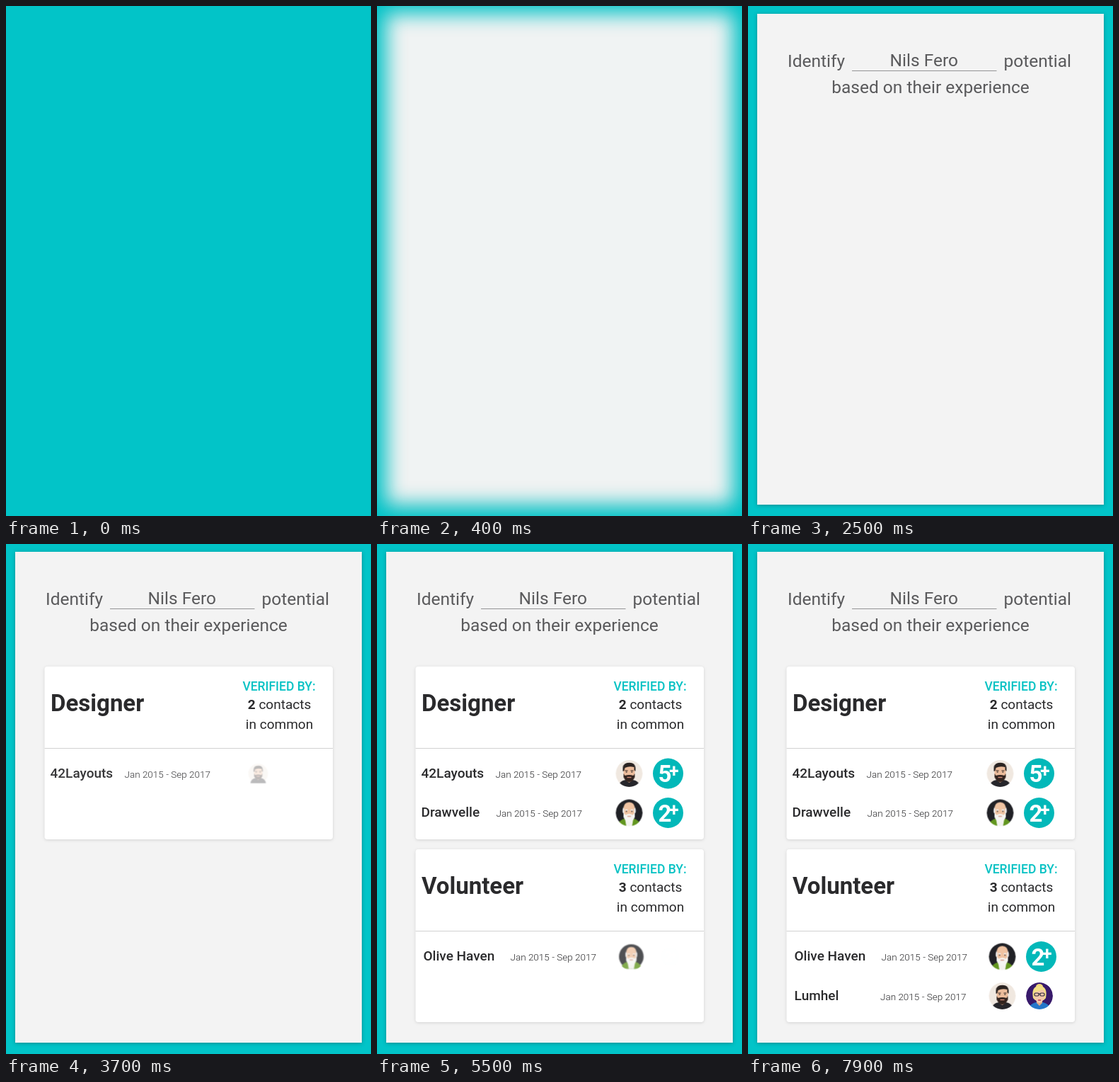
Recreate the animation shown at these times as an HTML page. Size 516 px wide and 720 px high, loop 8 s.

```html
<!DOCTYPE html>
<html lang="en">
<head>
<meta charset="utf-8">
<title>Potential by experience</title>
<style>
  html, body { margin: 0; width: 100%; height: 100%; overflow: hidden; background: #02c4c8; }
  #stage { position: relative; width: 516px; height: 720px; overflow: hidden; background: #02c4c8; }
  #panel { position: absolute; left: 13px; top: 11px; width: 490px; height: 693px;
           background: #f3f3f3; box-shadow: 0 1px 5px rgba(0, 70, 75, .45); }
  svg { position: absolute; left: 0; top: 0; }
  text { font-family: Roboto, sans-serif; fill: #2a2a2c; white-space: pre; }
  .head text { font-size: 24.5px; fill: #5a5a5c; }
  .card, .pop { transform-box: fill-box; transform-origin: center; }
  .sheet { fill: #fff; filter: drop-shadow(0 1px 2px rgba(0, 0, 0, .13)); }
  .title { font-size: 33px; font-weight: 700; }
  .verified { font-size: 17.5px; font-weight: 500; fill: #08c2c4; }
  .note { font-size: 19px; }
  .org { font-size: 19px; font-weight: 500; }
  .dates { font-size: 13.5px; font-weight: 300; }
  .badge text { fill: #fff; font-weight: 700; }
  .mid { text-anchor: middle; }
  .bold { font-weight: 700; }
</style>
</head>
<body>
<div id="stage">
  <div id="panel"></div>
  <svg id="scene" width="516" height="720" viewBox="0 0 516 720"></svg>
</div>
<script>
const LOOP = 8000;
const PERSON = 'Nils Fero';

const text = (cls, x, y, s) => `<text class="${cls}" x="${x}" y="${y}">${s}</text>`;

// Faces are drawn around 0,0 inside a circle of radius 19.
const faces = {
  dark: `<circle r="19" fill="#f0e8e0"/>
    <path d="M-15 19Q-14 10-5 9H5Q14 10 15 19Z" fill="#26262b"/>
    <path d="M-4 5H4V10L0 13L-4 10Z" fill="#d9a384"/>
    <path d="M-8-6Q-8-14 0-14Q8-14 8-6V2Q7 10 0 11Q-7 10-8 2Z" fill="#edbd9c"/>
    <path d="M-9-3Q-10-14-3-15Q8-17 9-8V-3L7-5V-9Q0-11-6-8L-7-4Z" fill="#2b2321"/>
    <path d="M-8 0L-6 3Q0 1 6 3L8 0V5Q5 12 0 12Q-5 12-8 5Z" fill="#33241f"/>
    <path d="M-3 5.5H3" stroke="#d08c79" stroke-width="1.4"/>
    <path d="M-6-4H-2M2-4H6" stroke="#33241f" stroke-width="1.2"/>
    <path d="M-4.5-2H-3M3-2H4.5" stroke="#222" stroke-width="1.3"/>`,
  elder: `<circle r="19" fill="#202126"/>
    <path d="M-16 19Q-15 10-6 8H6Q15 10 16 19Z" fill="#62961f"/>
    <path d="M-6 8H6L4 19H-4Z" fill="#f2f2ee"/>
    <path d="M-8-5Q-8-15 0-15Q8-15 8-5V2Q7 9 0 10Q-7 9-8 2Z" fill="#efc3a2"/>
    <path d="M-8-8Q-10-5-9 0L-7 1V-5ZM8-8Q10-5 9 0L7 1V-5Z" fill="#eee"/>
    <path d="M-8 0L-5 3Q0 0 5 3L8 0V6Q5 13 0 13Q-5 13-8 6Z" fill="#f5f5f2"/>
    <path d="M-2.5 5H2.5" stroke="#cf8d7b" stroke-width="1.3"/>
    <path d="M-6-4H-2M2-4H6" stroke="#eee" stroke-width="1.4"/>
    <path d="M-4.5-2H-3M3-2H4.5" stroke="#333" stroke-width="1.3"/>`,
  blonde: `<circle r="19" fill="#381a6b"/>
    <path d="M-15 19Q-14 11-5 9H5Q14 11 15 19Z" fill="#2476c9"/>
    <ellipse cy="-13" rx="5" ry="4" fill="#f0d676"/>
    <path d="M-9 3Q-12-14 0-14Q12-14 9 3L6 6H-6Z" fill="#f3df86"/>
    <path d="M-4 5H4V10L0 14L-4 10Z" fill="#dda78b"/>
    <path d="M-7-5Q0-7 4-9Q7-8 7-5V2Q5 9 0 10Q-5 9-7 2Z" fill="#f2c8ab"/>
    <g fill="none" stroke="#27253a" stroke-width="1.2"><rect x="-7" y="-4" width="6" height="4" rx="1.5"/>
    <rect x="1" y="-4" width="6" height="4" rx="1.5"/><path d="M-1-3H1"/></g>
    <path d="M-2 6H2" stroke="#cc4052" stroke-width="1.6"/>`
};

const avatar = (kind, x, y) =>
  `<g transform="translate(${x} ${y})" clip-path="url(#disc)"><g class="pop">${faces[kind]}</g></g>`;

const badge = (n, x, y) => `<g class="pop badge"><circle cx="${x}" cy="${y}" r="21.5" fill="#02b8b9"/>
  <text x="${x - 14}" y="${y + 12}" font-size="33">${n}</text>
  <text x="${x + 1.5}" y="${y + 4.5}" font-size="25">+</text></g>`;

const row = ({ org, x, dx, y, icons }) => `<g class="row">
  <g class="pop">${text('org', x, y, org)}${text('dates', dx, y + .3, 'Jan 2015 - Sep 2017')}</g>
  ${icons}</g>`;

const card = (title, count, y, rows) => `<g class="card">
  <rect class="sheet" x="54.5" y="${y}" width="407.5" height="244" rx="4"/>
  <path d="M54.5 ${y + 115.5}H462" stroke="#d2d2d2"/>
  ${text('title', 63, y + 62.5, title)}
  ${text('verified mid', 386, y + 34, 'VERIFIED BY:')}
  ${text('note mid', 386.5, y + 59.5, `<tspan class="bold">${count}</tspan> contacts`)}
  ${text('note mid', 386.5, y + 88, 'in common')}
  ${rows.map(row).join('')}</g>`;

const scene = document.getElementById('scene');
scene.innerHTML = `<defs><clipPath id="disc"><circle r="19"/></clipPath></defs>
  <g class="head">
    <g id="prompt">
      ${text('', 56, 86, 'Identify')}${text('', 361.5, 86, 'potential')}
      <path d="M147 91.5H351.5" stroke="#949496"/>
      ${text('mid', 258, 122.8, 'based on their experience')}
    </g>
    ${text('mid', 248.8, 85, [...PERSON].map(c => `<tspan class="key">${c}</tspan>`).join(''))}
  </g>` +
  card('Designer', 2, 173, [
    { org: '42Layouts', x: 62.5, dx: 167.5, y: 329.5, icons: avatar('dark', 356.5, 324) + badge(5, 411.5, 324) },
    { org: 'Drawvelle', x: 62.5, dx: 168.5, y: 385, icons: avatar('elder', 356.5, 379.5) + badge(2, 411.5, 379.5) }
  ]) +
  card('Volunteer', 3, 431, [
    { org: 'Olive Haven', x: 65.5, dx: 188.5, y: 588, icons: avatar('elder', 359.5, 582.5) + badge(2, 414.5, 582.5) },
    { org: 'Lumhel', x: 65.5, dx: 187, y: 643.5, icons: avatar('dark', 359.5, 638) + avatar('blonde', 412, 638) }
  ]);

const play = (el, frames) => el.animate(frames, { duration: LOOP, iterations: Infinity });

function reveal(el, start, length, from, to, easing = 'linear') {
  play(el, [
    { ...from, offset: 0 },
    { ...from, offset: start / LOOP, easing },
    { ...to, offset: (start + length) / LOOP },
    { ...to, offset: 1 }
  ]);
}

const hidden = { opacity: 0 }, shown = { opacity: 1 };

play(document.getElementById('panel'), [
  [0, 0, 52], [200, .55, 35], [400, .99, 14], [600, 1, 0], [LOOP, 1, 0]
].map(([t, opacity, blur]) => ({ offset: t / LOOP, opacity, filter: `blur(${blur}px)` })));

reveal(document.getElementById('prompt'), 900, 400, hidden, shown);

document.querySelectorAll('.key').forEach((key, i) =>
  reveal(key, 1450 + i * 95, 1, { fillOpacity: 0 }, { fillOpacity: 1 }));

document.querySelectorAll('.card').forEach((el, i) => {
  const start = 3000 + i * 1700;
  reveal(el, start, 400, { opacity: 0, transform: 'scale(.966)' }, { opacity: 1, transform: 'scale(1)' });
  el.querySelectorAll('.row').forEach((r, j) =>
    r.querySelectorAll('.pop').forEach((part, k) => {
      const from = k ? { opacity: 0, transform: 'scale(.6)' } : hidden;
      const to = k ? { opacity: 1, transform: 'scale(1)' } : shown;
      reveal(part, start + 500 + j * 450 + k * 150, 250, from, to, 'ease-out');
    }));
});
</script>
</body>
</html>
```
